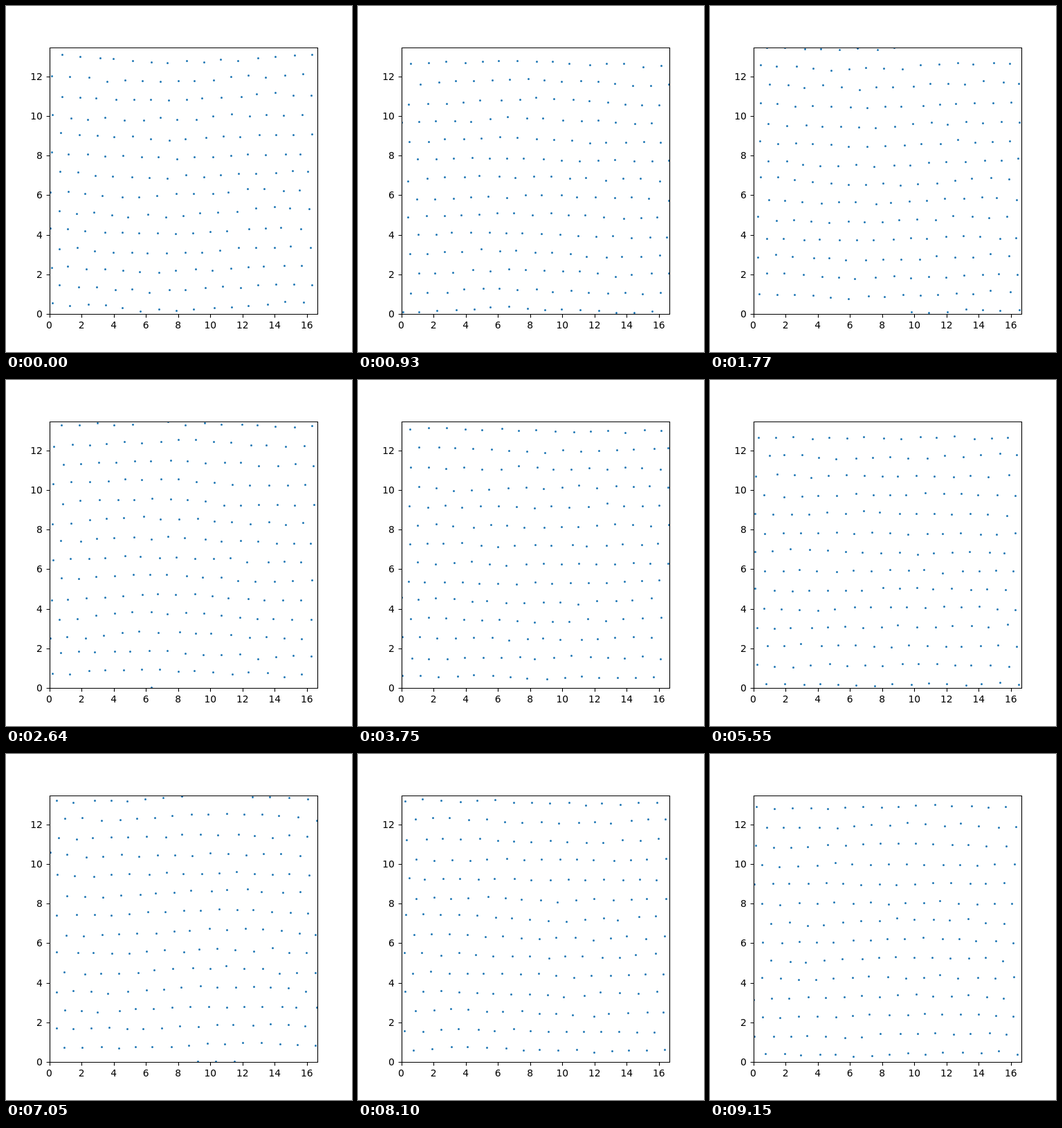
An HTML page for the animation above (9180 ms loop, 500 by 500 pixels).

```html
<!DOCTYPE html>
<html lang="en">
<head>
<meta charset="utf-8">
<title>Vibrating particle lattice</title>
<style>
html, body { margin: 0; width: 100%; height: 100%; overflow: hidden; background: #fff; }
svg { display: block; width: 500px; height: 500px; }
text { font: 13.89px "DejaVu Sans", sans-serif; fill: #000; }
#dots { fill: none; stroke: #1f77b4; stroke-width: 3; stroke-linecap: round; }
#axes { fill: none; stroke: #000; stroke-width: 1.11; }
</style>
</head>
<body>
<svg viewBox="0 0 500 500">
  <clipPath id="box"><rect x="63" y="60" width="387.5" height="385.5"/></clipPath>
  <g clip-path="url(#box)"><path id="dots"/></g>
  <path id="axes"/>
  <g id="labels"></g>
</svg>
<script>
const STEP = 30, STEPS = 306, TAU = 2 * Math.PI;
const LEFT = 62.5, TOP = 60, W = 387.5, H = 385;
const COLS = 15, ROWS = 14, DX = W / COLS, DY = H / ROWS;
const SPAN_X = 16.65, SPAN_Y = 13.458;
const $ = id => document.getElementById(id);
const snap = v => Math.floor(v + 0.5) + 0.5;
const wrap = (v, size) => ((v % size) + size) % size;

// Axes
function label(text, x, y, anchor) {
  const el = document.createElementNS("http://www.w3.org/2000/svg", "text");
  el.setAttribute("x", x);
  el.setAttribute("y", y);
  el.setAttribute("text-anchor", anchor);
  el.textContent = text;
  $("labels").append(el);
}
let lines = "M63.5 60.5H450.5V445.5H63.5Z";
for (let v = 0; v <= 16; v += 2) {
  const x = LEFT + v / SPAN_X * W;
  lines += `M${snap(x)} 445.5v4.9`;
  label(v, x, 466, "middle");
}
for (let v = 0; v <= 12; v += 2) {
  const y = TOP + H - v / SPAN_Y * H;
  lines += `M63.5 ${snap(y)}h-4.9`;
  label(v, 52.8, Math.round(y) + 5, "end");
}
$("axes").setAttribute("d", lines);

// Seeded random numbers
let seed = 20117;
function rand() {
  seed = (seed * 1664525 + 1013904223) % 4294967296;
  return seed / 4294967296;
}

// Thermal vibration: lattice waves with the dispersion of a triangular lattice
const modes = [];
while (modes.length < 90) {
  const p = Math.floor(rand() * COLS) - 7, q = Math.floor(rand() * ROWS) - 6;
  const kx = TAU * p / COLS, ky = TAU * q / ROWS;
  const bonds = [kx, kx / 2 + ky, ky - kx / 2];
  const omega = Math.sqrt(0.45 * bonds.reduce((s, b) => s + Math.sin(b / 2) ** 2, 0));
  if (omega < 0.2) continue;
  const amp = (0.4 + rand()) / omega, turn = rand() * TAU;
  modes.push({ kx, ky, omega, amp, phase: rand() * TAU, ux: Math.cos(turn), uy: Math.sin(turn) });
}
const power = modes.reduce((s, m) => s + m.amp * m.amp / 4, 0);
for (const m of modes) m.amp *= 1.9 / Math.sqrt(power);

// Long vertical swell: [step, cosine part, sine part]
const SWELL = [
  [0, -3.6, 2.4], [31, 2.7, -1.8], [88, 3.15, -2.7], [125, -1.3, -0.25],
  [185, 0.1, 0.2], [235, 1.7, 3], [305, 1.2, 1.6]
];
const SWELL_RATE = TAU / 60;

function swellAt(n) {
  let i = 0;
  while (i < SWELL.length - 2 && n > SWELL[i + 1][0]) i++;
  const a = SWELL[i], b = SWELL[i + 1];
  const u = (n - a[0]) / (b[0] - a[0]), s = u * u * (3 - 2 * u);
  const wa = (1 - s) * Math.cos(SWELL_RATE * (n - a[0]));
  const wb = s * Math.cos(SWELL_RATE * (n - b[0]));
  return [1, 2].map(k => wa * a[k] + wb * b[k]);
}

function draw(n) {
  const [sc, ss] = swellAt(n);
  let d = "";
  for (let j = 0; j < ROWS; j++) {
    for (let i = 0; i < COLS; i++) {
      const col = i + (j % 2) / 2;
      let x = 79 + DX * col - 0.131 * n;
      let y = 77.9 + DY * j + 0.1775 * n;
      const angle = TAU * (x - LEFT) / W;
      y += sc * Math.cos(angle) + ss * Math.sin(angle);
      for (const m of modes) {
        const u = m.amp * Math.cos(m.kx * col + m.ky * j - m.omega * n + m.phase);
        x += u * m.ux;
        y += u * m.uy;
      }
      x = LEFT + wrap(x - LEFT, W);
      y = TOP + wrap(y - TOP, H);
      d += `M${Math.floor(x) + 0.5} ${Math.floor(y) + 0.5}h0`;
    }
  }
  $("dots").setAttribute("d", d);
}

const start = performance.now();
let shown = -1;
function tick() {
  const n = Math.floor((performance.now() - start) / STEP) % STEPS;
  if (n !== shown) draw(shown = n);
  requestAnimationFrame(tick);
}
tick();
</script>
</body>
</html>
```
